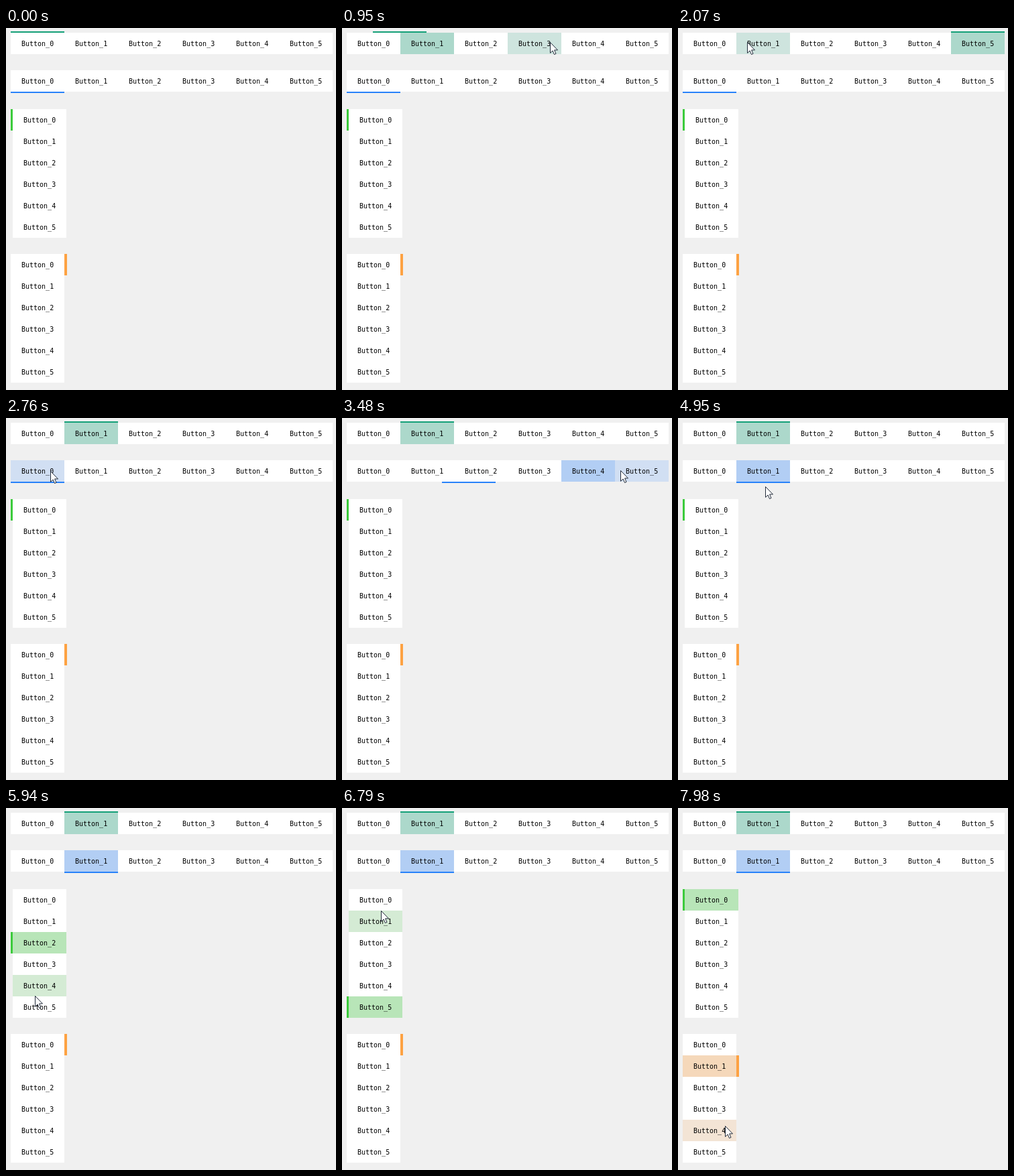
These frames come from a looping animation (492x540 px, 8 s). An HTML page:

```html
<!DOCTYPE html>
<html lang="en">
<head>
<meta charset="utf-8">
<title>Navigation buttons</title>
<style>
html, body { margin: 0; width: 100%; height: 100%; overflow: hidden; background: #f0f0f0; }
svg { display: block; }
text { font: 10px "DejaVu Sans Mono", "Liberation Mono", monospace; white-space: pre; }
</style>
</head>
<body>
<svg id="stage" width="492" height="540"></svg>
<script>
const LOOP = 8000, SLIDE = 185, W = 80, H = 32, COUNT = 6;
const stage = document.getElementById('stage');

// bar: the marker's box, relative to its button
const navs = [
  { x: 7, y: 7, dx: W, dy: 0, bar: [0, -2, W, 2], color: '#14a078' },
  { x: 7, y: 63, dx: W, dy: 0, bar: [0, H, W, 2], color: '#2882fa' },
  { x: 10, y: 121, dx: 0, dy: H, bar: [-3, 0, 3, H], color: '#3ccb3c' },
  { x: 7, y: 337, dx: 0, dy: H, bar: [W, 0, 4, H], color: '#fda243' }
];

// Pointer stops; a click presses whichever button lies under the pointer.
const stop = (t, x, y) => ({ t, x, y });
const click = (t, x, y) => ({ t, x, y, press: true });
const stops = [
  stop(200, 416, 507), click(860, 145, 22), stop(950, 310, 21),
  click(1400, 450, 30), stop(2070, 103, 21), click(2190, 103, 21),
  stop(2610, 100, 72), stop(3000, 45, 84), click(3398, 372, 81),
  stop(3480, 415, 78), click(3760, 440, 76), click(4600, 125, 77),
  stop(4950, 130, 102), stop(5430, 50, 196), click(5560, 50, 196),
  click(6150, 42, 292), stop(6790, 58, 153), click(7060, 52, 136),
  stop(7630, 58, 382), click(7760, 58, 382), stop(7980, 70, 474)
];

const mix = (a, b, k) => a + (b - a) * k;
const easeOut = k => 1 - (1 - k) ** 2;

function add(tag, attrs) {
  const el = document.createElementNS('http://www.w3.org/2000/svg', tag);
  for (const key in attrs) el.setAttribute(key, attrs[key]);
  return stage.appendChild(el);
}

function rect(x, y, width, height, fill) {
  return add('rect', { x, y, width, height, fill, 'shape-rendering': 'crispEdges' });
}

// Index of the button at a point, or -1
function buttonAt(nav, p) {
  const col = Math.floor((p.x - nav.x) / W), row = Math.floor((p.y - nav.y) / H);
  const [along, across] = nav.dx ? [col, row] : [row, col];
  return across === 0 && along >= 0 && along < COUNT ? along : -1;
}

for (const nav of navs) {
  nav.clicks = stops.filter(s => s.press)
    .map(s => ({ t: s.t, target: buttonAt(nav, s) }))
    .filter(c => c.target >= 0);
  nav.boxes = [];
  for (let i = 0; i < COUNT; i++) {
    const x = nav.x + i * nav.dx, y = nav.y + i * nav.dy;
    nav.boxes.push(rect(x, y, W, H, '#fff'));
    add('text', { x: x + 16, y: y + 20 }).textContent = 'Button_' + i;
  }
  const [x, y, w, h] = nav.bar;
  nav.marker = rect(nav.x + x, nav.y + y, w, h, nav.color);
}

const pointer = add('path', {
  d: 'M.5.5V16.3L4.1 12.9 6.5 18.5 9 17.4 6.6 11.9H11.5Z',
  fill: '#fff', stroke: '#222b3a'
});

function pointerAt(t) {
  if (t < stops[0].t) return null;
  const i = stops.findIndex(s => s.t > t);
  if (i < 0) return stops[stops.length - 1];
  const a = stops[i - 1], b = stops[i], k = easeOut((t - a.t) / (b.t - a.t));
  return { x: Math.round(mix(a.x, b.x, k)), y: Math.round(mix(a.y, b.y, k)) };
}

// Active and hovered buttons are tints of the accent over the page.
function paint(box, color, opacity) {
  box.setAttribute('fill', color);
  box.setAttribute('fill-opacity', opacity);
}

function drawNav(nav, t, pos) {
  let active = -1, place = 0;
  for (const c of nav.clicks) {
    if (t < c.t) break;
    place = mix(place, c.target, Math.min(1, (t - c.t) / SLIDE));
    active = c.target;
  }
  const hover = pos ? buttonAt(nav, pos) : -1;
  nav.boxes.forEach((box, i) => {
    if (i === active) paint(box, nav.color, 0.31);
    else if (i === hover) paint(box, nav.color, 0.155);
    else paint(box, '#fff', 1);
  });
  nav.marker.setAttribute('x', Math.round(nav.x + nav.bar[0] + place * nav.dx));
  nav.marker.setAttribute('y', Math.round(nav.y + nav.bar[1] + place * nav.dy));
}

function draw(t) {
  const pos = pointerAt(t);
  for (const nav of navs) drawNav(nav, t, pos);
  pointer.setAttribute('visibility', pos ? 'visible' : 'hidden');
  if (pos) pointer.setAttribute('transform', `translate(${pos.x} ${pos.y})`);
}

let begin;
function tick(now) {
  begin ??= now;
  draw((now - begin) % LOOP);
  requestAnimationFrame(tick);
}
draw(0);
requestAnimationFrame(tick);
</script>
</body>
</html>
```
